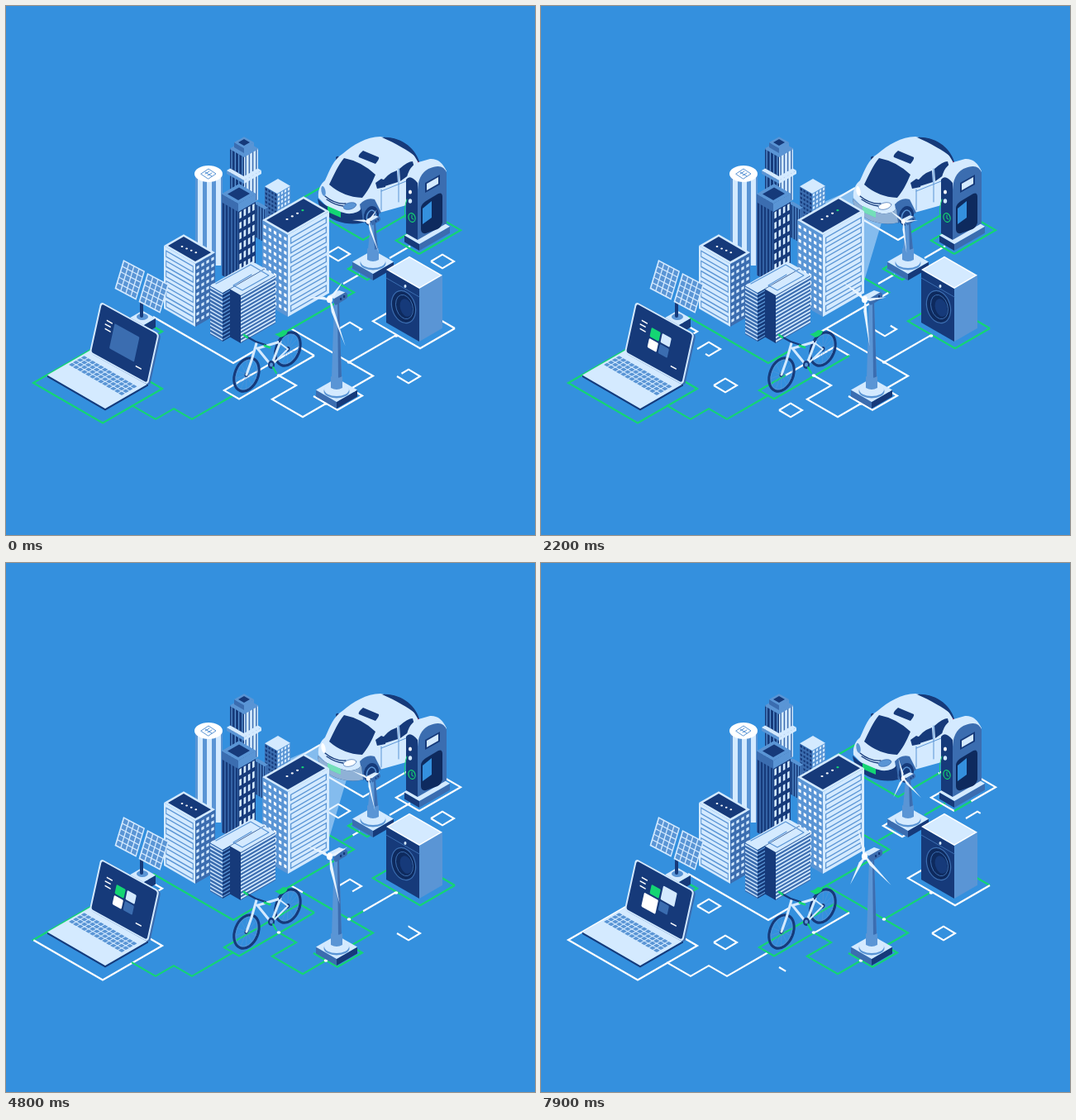
These frames come from a looping animation (640x640 px, 8 s). An HTML page with a canvas:

```html
<!DOCTYPE html>
<html lang="en">
<head>
<meta charset="utf-8">
<title>Connected city</title>
<style>
html, body { margin: 0; width: 100%; height: 100%; overflow: hidden; background: #3490de; }
canvas { display: block; }
</style>
</head>
<body>
<canvas id="stage" width="640" height="640"></canvas>
<script>
const c = document.getElementById('stage').getContext('2d');
const LOOP = 8000, ISO = .577, SKY = '#3490de', L = '#d4eaff', N = '#163a7a', D = '#0e2a5e',
  M = '#3b6db0', B = '#5a95d5', W = '#fff', G = '#14d573', RED = '#d52d62';

// Flat shapes
const fill = (col, d) => { c.fillStyle = col; c.fill(new Path2D(d)); };
const line = (col, w, d) => { c.strokeStyle = col; c.lineWidth = w; c.stroke(new Path2D(d)); };
const rect = (col, x, y, w, h, r = 0) => {
  c.fillStyle = col;
  c.beginPath(); c.roundRect(x, y, w, h, r); c.fill();
};
function oval(col, x, y, rx, ry, turn = 0, w = 0) {
  c.beginPath();
  c.ellipse(x, y, rx, ry, turn, 0, 7);
  if (w) { c.strokeStyle = col; c.lineWidth = w; c.stroke(); }
  else { c.fillStyle = col; c.fill(); }
}
function plane(x, y, ux, uy, vx, vy, draw) {
  c.save();
  c.transform(ux, uy, vx, vy, x, y);
  draw();
  c.restore();
}
const repeat = (n, f) => { for (let i = 0; i < n; i++) f(i); };
const fade = (alpha, draw) => { c.globalAlpha = alpha; draw(); c.globalAlpha = 1; };
const ramp = (t, start, len) => {
  const k = Math.max(0, Math.min(1, (t - start) / len));
  return k * k * (3 - 2 * k);
};

// Isometric solids; x, y is the front corner of the top, a and b its reach to left and right
function roof(col, x, y, a, b, inset = 0) {
  y -= 2 * inset * ISO; a -= 2 * inset; b -= 2 * inset;
  fill(col, `M${x} ${y}l${-a} ${-a * ISO} ${b} ${-b * ISO} ${a} ${a * ISO}z`);
}
function box(x, y, a, b, h, top, left, right) {
  fill(left, `M${x} ${y}v${h}l${-a} ${-a * ISO}v${-h}z`);
  fill(right, `M${x} ${y}v${h}l${b} ${-b * ISO}v${-h}z`);
  roof(top, x, y, a, b);
}
// Even cells on a wall; a negative width runs to the left
function wall(col, x, y, w, h, cols, rows, fx, fy) {
  plane(x, y, 1, -Math.sign(w) * ISO, 0, 1, () => {
    const cw = w / cols, ch = h / rows;
    c.fillStyle = col;
    repeat(cols, i => repeat(rows, j =>
      c.fillRect((i + (1 - fx) / 2) * cw, (j + (1 - fy) / 2) * ch, cw * fx, ch * fy)));
  });
}
function balconies(x, y, w, h, rows) {
  wall(B, x, y, w, h, 1, rows, .88, .7);
  wall(L, x, y, w, h, 1, rows, .83, .44);
}

// Wires run in steps along the two ground axes by turns; each flip time sweeps the other colour in
function wire(t, x, y, steps, on, ...flips) {
  let d = `M${x} ${y}`, length = 0;
  steps.forEach((s, i) => {
    d += `l${s} ${i % 2 ? -s * ISO : s * ISO}`;
    length += Math.abs(s) * Math.hypot(1, ISO);
  });
  let run = length;
  for (const start of flips) {
    if (t <= start) break;
    on = !on;
    run = Math.min(length, (t - start) * .13);
  }
  if (run < length) {
    c.setLineDash([0, run, 999, 0]);
    line(on ? W : G, 2.2, d);
    c.setLineDash([run, 999]);
  }
  line(on ? G : W, 2.2, d);
  c.setLineDash([]);
}
function network(t) {
  wire(t, 170, 452, [19, -72, -84, 72], 1, 3250);                 // laptop
  wire(t, 275, 471, [0, -50, -22, -22, -29], 1, 4930);
  wire(t, 373, 423, [0, -91, -18, 91, 18], 0, 950, 7515);         // bike
  wire(t, 178, 376, [97, 25], 0, 620, 6515);                      // solar panel
  wire(t, 165, 380, [24, -10], 1, 400, 5000);
  wire(t, 330, 447, [21, -29, 37, 28], 0, 2600);                  // large turbine
  wire(t, 372, 472, [29, 30, -29], 0, 3000);
  wire(t, 405, 470, [0, 39, -99], 0, 3700);
  wire(t, 415, 431, [0, 57], 0, 4650);                            // washing machine
  wire(t, 543, 390, [0, -42, -57, 42, 57], 0, 425, 6425);
  wire(t, 330, 399, [0, 91, -31], 1, 1400, 3480);                 // right block
  wire(t, 408, 336, [0, 20], 0, 4700);
  wire(t, 467, 314, [0, -30, -23, 30], 1, 5700);                  // small turbine
  wire(t, 464, 305, [0, 25], 0, 4900);
  wire(t, 500, 300, [0, 50, -28, -50, 28], 1, 2400, 7720);        // charger
  wire(t, 380, 220, [0, -28.5, 80.5, 56], 1, 1100, 6500);         // car
}

// Ground tiles draw on, hold and draw off, one after another
const CYCLE = 4700;
const tiles = [[302, 489], [223, 459], [203, 415], [487, 448], [528, 309], [402, 300], [416, 391]];
function drawTile([x, y], i, t) {
  const age = (t + 2 * CYCLE - 300 - i * CYCLE / tiles.length) % CYCLE, len = 65.1;
  const head = Math.min(1, age / 680), tail = Math.max(0, (age - 2320) / 680);
  if (tail >= 1) return;
  c.setLineDash([0, tail * len, (head - tail) * len, 999]);
  line(W, 2.1, `M${x - 14} ${y}l14-8.3 14 8.3-14 8.3-14-8.3`);
  c.setLineDash([]);
}

function car(glow) {
  const bumper = 'M377 233Q390 247 412 251 425 252 430 245L432 262Q417 266 400 260 379 252 377 233z';
  const plate = 'M389 242l16 7v7l-16-7z';
  fill(N, 'M399 183q3-3 6 1l-1 7q-5-1-5-8zM452 159c25-3 45 13 49 33l-16 6z');
  fill(L, 'M378 232C377 222 381 215 386 211C392 198 396 186 407 179C420 168 436 158 453 158C472 162 490 171 498 188L502 214 488 240 452 250 432 262 402 257Z');
  fill(N, 'M455 159c17-1 36 9 42 24c-12-9-24-16-42-24z');
  fill(N, 'M391 216C397 204 402 192 409 184Q430 188 447 204C442 216 437 225 431 232Q408 231 391 216z');
  fill(N, 'M432 175l19 8q1 2-4 8l-20-8q-2-2 5-8z');
  fill(N, 'M452 220Q456 208 466 202L473 199 474 213zM476 197Q486 188 492 188L495 199 477 212z');
  line(B, 1, 'M475 197v40M454 222v25M454 224l45-18');
  fill(N, 'M447 214l7-5 5 2v8l-10 2z');
  fill(M, 'M428 240q8-9 18-6l8 16-22 13z');
  fill(N, bumper);
  fade(glow, () => fill('#8fb1d6', bumper));
  fill(G, plate);
  fade(glow * .5, () => fill(L, plate));
  line(N, 1.3, 'M386 230q12 10 25 9M388 234q10 7 20 8');
  const lamp = glow > .5 ? W : B;
  oval(lamp, 384, 224, 2.5, 6, -.2);
  oval(lamp, 416, 242, 8, 4, -.25);
  oval(M, 416, 242, 8, 4, -.25, .7);
  oval(N, 442, 254, 9, 12, .2);
  oval(B, 442, 255, 5.5, 8, .2, 1.5);
  fill(RED, 'M498 188l4 2v8l-3-3z');
}

function charger() {
  box(500, 288, 18, 37, 8, L, N, M);
  fill(L, 'M484 218Q484 195 499 189L513 185Q526 184 533 200L498 222z');
  fill(N, 'M484 210Q489 203 498 214V283l-14-8z');
  fill(M, 'M498 224Q498 204 511 197 529 189 533 202V263l-35 20z');
  fill(N, 'M507 214l18-10v12l-18 10z');
  fill(L, 'M509 215l14-8v8l-14 8z');
  fill(D, 'M502 244q1-5 6-8l15-9q5-2 5 4v31q-1 5-6 8l-14 5q-6 1-6-5z');
  fill(SKY, 'M504 245l11-9v20l-11 8z');
  oval(W, 489, 225, 2, 2.6);
  oval(L, 489, 236, 2.2, 2.8);
  oval(G, 491, 256, 4, 5.5, -.3, 1.2);
  line(G, 1, 'M491 253v4l2 1M485 234q-4 11-2 23');
}

function skyline() {
  // Round tower with helipad
  rect(B, 229, 204, 33, 110);
  repeat(3, i => rect(L, 232 + i * 11, 206, 6, 108));
  oval(W, 245, 203, 17, 10);
  line(B, 1, 'M236 203l9-6 9 6-9 6zM241 201l8 5M241 203l5-3M244 205l5-3');

  // Crowned tower
  box(288, 182, 17, 17, 62, B, N, L);
  wall(B, 288, 182, -17, 62, 4, 1, .3, 1);
  wall(M, 288, 182, 17, 62, 4, 1, .35, 1);
  box(288, 211, 21, 21, 4, L, B, L);
  box(288, 183, 17, 17, 23, B, N, L);
  wall(B, 288, 183, -17, 23, 4, 1, .3, 1);
  wall(M, 288, 183, 17, 23, 4, 1, .35, 1);
  box(288, 172, 12, 12, 6, B, M, B);
  roof(N, 288, 172, 12, 12, 2.5);

  // Corner block and the striped one before it
  box(328, 227, 15, 16, 36, L, M, B);
  wall(N, 328, 227, -15, 36, 4, 7, .6, .5);
  wall(L, 328, 227, 16, 36, 4, 7, .55, .6);
  box(313, 246, 13, 4, 40, B, N, M);
  wall(B, 313, 246, -13, 40, 4, 1, .4, 1);

  // Dark tower
  box(281, 239, 20, 21, 98, B, M, N);
  wall(N, 281, 239, -20, 98, 5, 1, .6, 1);
  wall(L, 281, 248, 21, 88, 4, 7, .5, .62);
  box(281, 239, 20, 21, 10, B, M, B);
  roof(N, 281, 239, 20, 21, 3.5);
}

function blocks() {
  box(341, 277, 31, 50, 99, L, B, L);
  wall(W, 341, 279, -31, 94, 5, 11, .5, .45);
  balconies(341, 280, 50, 94, 8);
  roof(N, 341, 277, 31, 50, 2.5);
  repeat(4, i => oval(i < 3 ? W : G, 340 + i * 6.3, 258 - i * 3.6, 1.6, 1.1));

  box(229, 312, 38, 24, 76, L, L, M);
  balconies(229, 314, -38, 73, 6);
  wall(L, 229, 314, 24, 72, 4, 9, .55, .45);
  roof(N, 229, 312, 38, 24, 2.5);
  repeat(4, i => oval(W, 213 + i * 5.6, 291 + i * 2.4, 1.4, 1));

  // Low office in two wings
  box(262, 347, 15, 51, 59, L, M, N);
  wall(L, 262, 347, -15, 59, 1, 13, 1, .35);
  wall(B, 262, 347, 9, 59, 1, 13, 1, .35);
  box(284, 350, 13, 42, 58, L, N, M);
  wall(L, 284, 350, 42, 58, 1, 13, 1, .45);
  line(B, 1.2, 'M254 336l42-23 22 13-32 18-11-6 22-13');
}

function washer() {
  box(500, 342, 40, 28, 64, W, N, B);
  roof(L, 500, 342, 40, 28, 1.5);
  line(M, 1, 'M460 329l40 23');
  oval(D, 481, 364, 14, 20, -.3);
  oval(M, 481, 364, 14, 20, -.3, 1.2);
  oval(M, 482, 364, 10, 15, -.3, 1);
  oval(N, 484, 365, 7, 11, -.3);
  oval(L, 483, 339, 1.5, 2);
}

function solar() {
  box(165, 387, 16, 16, 11, L, M, N);
  oval(B, 165, 376, 7, 4);
  line(N, 4, 'M164 357v18');
  repeat(2, i => plane(142 + i * 29, 307 + i * 16, 1, .53, -.3, 1, () => {
    rect(L, 0, 0, 26, 35);
    repeat(4, x => repeat(5, y => rect(B, 1.5 + x * 6.1, 1.5 + y * 6.6, 4.9, 5.4)));
  }));
}

function laptop(t) {
  box(120, 487, 70, 52, 2.5, L, N, N);
  plane(76, 434, 1, ISO, 1, -ISO, () =>
    repeat(13, i => repeat(4, j => rect(B, i * 5, j * 4.9, 4, 3.9, .5))));
  const grow = [0, ramp(t, 7300, 700), ramp(t, 5000, 900), 0], wide = 1 - ramp(t, 0, 650);
  plane(114.5, 357.5, 1, .55, -.22, 1, () => {
    rect(M, 1, 0, 72, 62, 4);
    rect(L, 0, 0, 71, 62, 4);
    rect(N, 1.8, 1.8, 67.4, 58.4, 3);
    repeat(3, i => rect(W, 11 - i % 2, 16 + i * 5, 7, 1.5));
    rect(W, 53, 48, 7, 1.5);
    // Tiles grow outward from the middle; the last one starts out covering them all
    [G, L, W, M].forEach((col, i) => {
      const sx = i % 2 ? 1 : -1, sy = i > 1 ? 1 : -1, cover = i == 3 ? wide : 0;
      const near = 1 - 16 * cover, size = 11 + 6 * grow[i] + 19 * cover, mid = near + size / 2;
      rect(col, 35.4 + sx * mid - size / 2, 30.4 + sy * mid - size / 2, size, size, 1.2);
    });
  });
}

function bike() {
  repeat(2, i => {
    const x = 291 + i * 50, y = 446 - i * 31;
    plane(x, y, Math.cos(.38), Math.sin(.38), -Math.sin(.38), Math.cos(.38), () => {
      repeat(6, k => {
        const a = k * Math.PI / 6, dx = Math.cos(a) * 13, dy = Math.sin(a) * 20;
        line(B, .5, `M${-dx} ${-dy}L${dx} ${dy}`);
      });
      oval(N, 0, 0, 14, 21, 0, 3.2);
      oval(B, 0, 0, 12, 18.8, 0, .7);
      oval(N, 0, 0, 2.3, 3);
    });
  });
  line(L, 3, 'M291 446l6-17 6-21M304 414l17 21 11-29-27 8');
  line(L, 2, 'M321 435l20-20-12-9');
  line(N, 2.2, 'M291 400l11 6 12 4M331 406l3-6');
  line(G, 2.8, 'M288 398l4 3M313 411l6 2');
  fill(G, 'M325 397q6-1 10-5l6 1q-1 6-9 8z');
  oval(N, 321, 434, 4, 5);
  oval(B, 321, 434, 2, 2.6);
  line(G, 2, 'M323 437l4 7');
}

// Blade tips follow a slanted ellipse, a little below the hub
function blades(x, y, size, t) {
  const turn = (56 - t * .097) * Math.PI / 180;
  plane(x, y, size, 0, 0, size, () => {
    repeat(3, i => {
      const a = turn + i * Math.PI * 2 / 3;
      const dx = 2 + 30.5 * Math.cos(a), dy = 11 + 16.6 * Math.cos(a) + 43.7 * Math.sin(a);
      const len = Math.hypot(dx, dy), nx = -dy / len * 2.7, ny = dx / len * 2.7;
      fill('#e8f4ff', `M0 0L${dx * .25 + nx} ${dy * .25 + ny} ${dx} ${dy} ${dx * .1 - nx * .5} ${dy * .1 - ny * .5}z`);
    });
    oval(W, 0, 0, 3.6, 4.2);
  });
}
// Plinth centre x, y with a tapering tower of the given height
function turbine(x, y, height, size, t) {
  const top = y - height, foot = y - 3;
  box(x, y + 14, 25, 25, 8, L, M, N);
  oval(B, x, y + 1, 15.5, 8.5);
  oval(L, x, y - 1, 15, 8);
  fill(B, `M${x - 3} ${top}h6l3 ${height - 15}q-6 4-12 0z`);
  fill(M, `M${x + 1} ${top}h2l3 ${height - 15}q-2 2-4 2z`);
  fill(B, `M${x - 7} ${foot - 14}q7 4 14 0v14q-7 4-14 0z`);
  plane(x, top, size, 0, 0, size, () => {
    fill(L, 'M-11-6l14-7 9 3-13 8z');
    fill(M, 'M-3-3l14-8q4 4 1 8l-13 8q-4-3-2-8z');
    repeat(2, i => rect(N, 4 + i * 4, -4 - i * 3, 2.2, 3));
  });
  blades(x - 8.5 * size, top - 2 * size, size, t);
}

function draw(t) {
  rect(SKY, 0, 0, 640, 640);
  c.lineJoin = 'miter';
  c.lineCap = 'butt';
  network(t);
  [[415, 431], [472, 399], [387, 481], [330, 447]].forEach(([x, y]) => oval(W, x, y, 2.4, 1.7));
  tiles.forEach((tile, i) => drawTile(tile, i, t));

  const glow = ramp(t, 150, 500) * (1 - ramp(t, 7250, 500));
  fade(glow * .5, () => fill(L, 'M384 219L338 239 350 320 390 336 412 262z'));
  c.lineCap = c.lineJoin = 'round';
  car(glow);
  charger();
  skyline();
  blocks();
  turbine(444, 310, 48, .68, t);
  washer();
  solar();
  laptop(t);
  bike();
  turbine(400, 465, 108, 1, t);
}

function frame(now) {
  draw(now % LOOP);
  requestAnimationFrame(frame);
}
draw(0);
requestAnimationFrame(frame);
</script>
</body>
</html>
```
